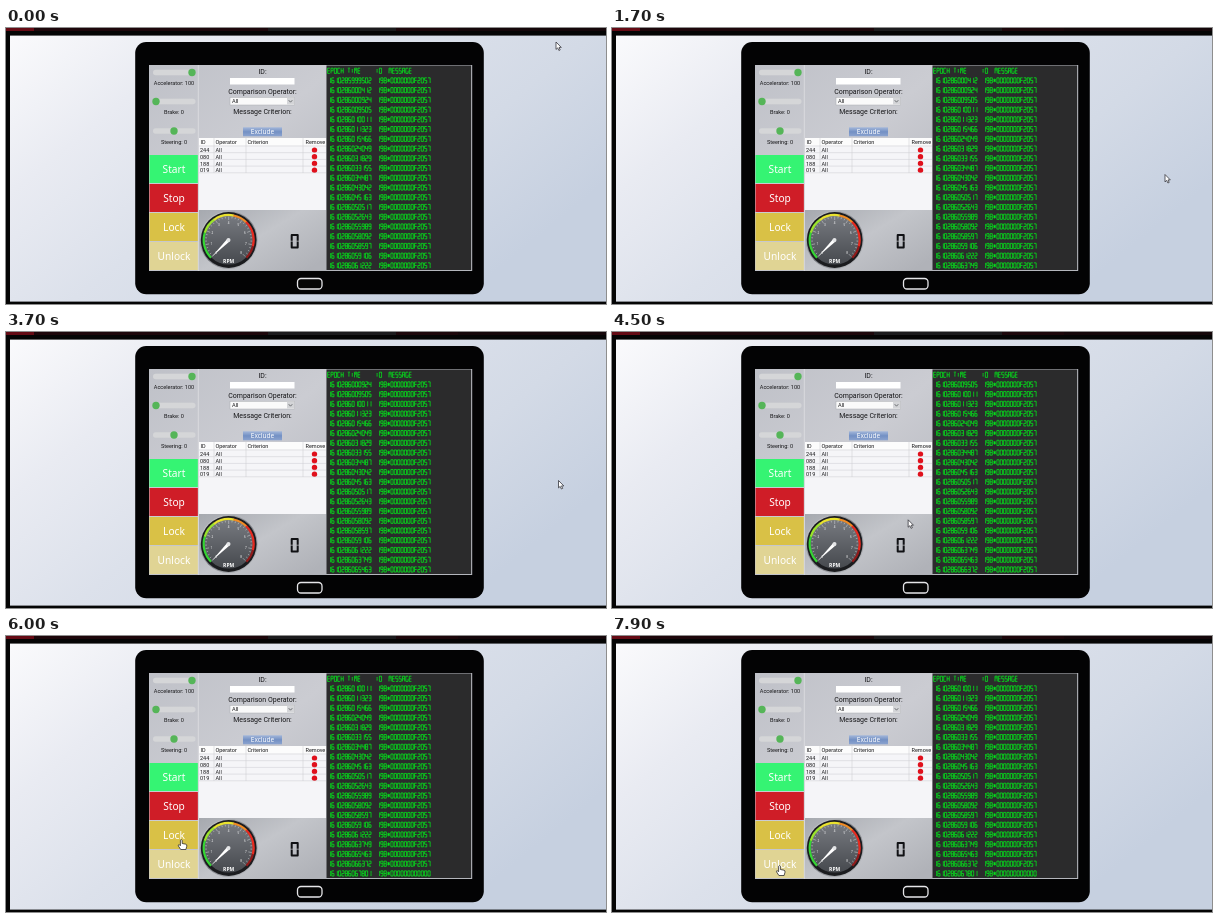
These frames come from a looping animation (600 by 276 pixels, 8 s). An HTML page:

```html
<!DOCTYPE html>
<html lang="en">
<head>
<meta charset="utf-8">
<title>Vehicle message monitor</title>
<style>
html, body { margin: 0; width: 100%; height: 100%; overflow: hidden; background: #000; }
svg { display: block; width: 100vw; height: 100vh; }
.ui { font-family: Roboto, Arial, sans-serif; fill: #151517; }
.btn { font-family: "Noto Sans", "Open Sans", sans-serif; fill: #fff; }
.mid { text-anchor: middle; }
.seg { fill: none; stroke: #00f01a; stroke-width: .75; }
</style>
</head>
<body>
<svg id="stage" viewBox="0 0 600 276" xmlns="http://www.w3.org/2000/svg"></svg>
<script>
const LOOP = 8000, STEP = 100, ROW = 9.74, ADVANCE = 3.37;
const stage = document.getElementById('stage');

const rect = (x, y, w, h, fill, more = '') =>
  `<rect x="${x}" y="${y}" width="${w}" height="${h}" fill="${fill}" ${more}/>`;
const circle = (x, y, r, fill, more = '') =>
  `<circle cx="${x}" cy="${y}" r="${r}" fill="${fill}" ${more}/>`;
const text = (s, x, y, size, cls = 'ui', more = '') =>
  `<text x="${x}" y="${y}" font-size="${size}" class="${cls}" ${more}>${s}</text>`;
const gradient = (id, dir, ...colors) =>
  `<linearGradient id="${id}" x2="${dir[0]}" y2="${dir[1]}">` + colors.map((c, i) =>
    `<stop offset="${i / (colors.length - 1)}" stop-color="${c}"/>`).join('') + '</linearGradient>';

// Segment lettering: a-g as on a display, i/l centre bars, x and y diagonals.
const GLYPHS = {
  0: 'abcdef', 1: 'bc', 2: 'abged', 3: 'abgcd', 4: 'fgbc', 5: 'afgcd', 6: 'afgedc', 7: 'abc',
  8: 'abcdefg', 9: 'abcdfg', A: 'abcefg', C: 'adef', D: 'abcdef', E: 'adefg', F: 'aefg', G: 'acdef',
  H: 'bcefg', I: 'il', M: 'abcefi', O: 'abcdef', P: 'abefg', S: 'afgcd', T: 'ail', '#': 'gilxy'
};
function segments(s, x, y, w = 2.2, h = 5.2) {
  const m = h / 2, c = w / 2;
  const bars = {
    a: [0, 0, w, 0], b: [w, 0, w, m], c: [w, m, w, h], d: [0, h, w, h], e: [0, m, 0, h],
    f: [0, 0, 0, m], g: [0, m, w, m], i: [c, h * .15, c, m], l: [c, m, c, h * .85],
    x: [0, h * .25, w, h * .75], y: [w, h * .25, 0, h * .75]
  };
  let d = '';
  [...s].forEach((ch, n) => {
    for (const k of GLYPHS[ch] || '') {
      const [x1, y1, x2, y2] = bars[k], ox = x + n * ADVANCE;
      d += `M${(ox + x1).toFixed(2)} ${(y + y1).toFixed(2)}L${(ox + x2).toFixed(2)} ${(y + y2).toFixed(2)}`;
    }
  });
  return `<path d="${d}" aria-label="${s}"/>`;
}

function slider(y, knob, label) {
  return rect(147, y - 2.7, 42.5, 5.4, '#d5d6d8', 'rx="2.7"') + circle(knob, y, 3.7, '#55b558') +
    text(label, 168, y + 12.6, 5.55, 'ui mid');
}

function button(label, y, fill) {
  return rect(143.5, y, 48.5, 28, fill) + text(label, 168, y + 17.9, 10.2, 'btn mid');
}

function table() {
  let s = rect(193, 110, 127.5, 72, '#f5f5f8') + rect(193, 110, 127.5, 7.5, '#fcfcfc');
  for (const [label, x] of [['ID', 194.5], ['Operator', 209.5], ['Criterion', 241.5], ['Remove', 299.5]])
    s += text(label, x, 115.8, 5.5);
  ['244', '080', '188', '019'].forEach((id, i) => {
    const y = 124.3 + i * 6.7;
    s += text(id, 194, y, 5.5) + text('All', 209.5, y, 5.5) + circle(308.5, y - 2.2, 2.7, '#e0101c');
  });
  let grid = '';
  for (let i = 0; i < 5; i++) grid += `M193 ${118 + i * 6.7}H320`;
  for (const x of [208, 240, 297]) grid += `M${x} 110V145`;
  return s + `<path d="${grid}" stroke="#c9c9ce" stroke-width=".5"/>`;
}

const polar = (r, deg) => {
  const a = deg * Math.PI / 180;
  return `${(222.7 + r * Math.sin(a)).toFixed(2)} ${(212 - r * Math.cos(a)).toFixed(2)}`;
};
const arc = (from, to, color) =>
  `<path d="M${polar(25, from)}A25 25 0 0 1 ${polar(25, to)}" fill="none" stroke="${color}" stroke-width="2.2"/>`;

function gauge() {
  let s = circle(222.7, 212, 29, 'url(#chrome)') + circle(222.7, 212, 27.9, '#1b1c1f') +
    circle(222.7, 212, 24.6, 'url(#dial)');
  s += arc(-135, -72, '#35d534') + arc(-73, -35, '#9be32c') + arc(-36, 12, '#e9e22f') +
    arc(11, 45, '#f08b24') + arc(44, 105, '#e62b20') + arc(104, 135, '#8f1b1b');
  let ticks = '';
  for (let i = 0; i <= 32; i++)
    ticks += `M${polar(i % 4 ? 21.8 : 20, -135 + i * 270 / 32)}L${polar(23.5, -135 + i * 270 / 32)}`;
  s += `<path d="${ticks}" stroke="#d9dadd" stroke-width=".5"/>`;
  for (let i = 0; i <= 8; i++) {
    const [x, y] = polar(17.6, -135 + i * 33.75).split(' ');
    s += text(i, x, +y + 1.1, 3, 'btn mid');
  }
  return s + text('RPM', 222.7, 234.5, 5, 'btn mid', 'font-weight="700"') +
    '<path d="M205.8 228.7L221.4 210.7L223.8 213.2Z" fill="#fff"/>' + circle(222.5, 212, 2, '#e4e5e7');
}

const EPOCHS = [5999502, 6000412, 6000924, 6009505, 6010011, 6011323, 6015466, 6024049,
  6031829, 6033155, 6034487, 6043042, 6045163, 6050517, 6052643, 6055989, 6058092, 6058597,
  6059106, 6061222, 6063749, 6065463, 6066372, 6067801];
const VISIBLE = 20;
// Newly received rows arrive at their own timestamps.
const arrivals = EPOCHS.slice(VISIBLE).map(e => e - EPOCHS[VISIBLE] + 1500);

function terminal() {
  const rows = EPOCHS.map((e, i) => {
    const y = 49.8 + i * ROW;
    const data = i === EPOCHS.length - 1 ? '000000000000' : '0000000F2057';
    return segments(String(1610280000000 + e), 322.4, y) + segments('198#' + data, 371.4, y);
  }).join('');
  return rect(320.5, 37, 145.7, 206, '#b4b6bc') + rect(320.5, 37.5, 144.6, 204.5, '#2b2b2c') +
    '<g class="seg">' +
    segments('EPOCH TIME', 321.6, 40.2) + segments('ID', 370, 40.2) + segments('MESSAGE', 383, 40.2) +
    `<g clip-path="url(#log)"><g id="rows">${rows}</g></g></g>`;
}

const defs = '<defs>' +
  gradient('page', [1, .55], '#fafafc', '#e9ebf2', '#dce1eb', '#d3dae6', '#c6d0e0') +
  gradient('metal', [.7, 1], '#bfc1c8', '#cbccd2', '#b6b8bf') +
  gradient('lower', [1, .8], '#a6a9af', '#c3c5ca', '#b0b2b8') +
  gradient('blue', [0, 1], '#a3b7da', '#7390c4', '#8ba3cf') +
  gradient('chrome', [1, 1], '#d9dbde', '#7b7e84', '#c9cbcf') +
  gradient('dial', [0, 1], '#777a80', '#46494e') +
  '<clipPath id="log"><rect x="320" y="48.3" width="146" height="193.7"/></clipPath></defs>';

const browser = rect(0, 0, 600, 276, '#050505') + rect(0, 0, 452, 3, '#1d070b') +
  rect(0, 0, 28, 3, '#650b15') + rect(262, 0, 128, 3, '#1c1b1d') + rect(452, 0, 148, 3, '#15070a') +
  rect(4, 7.6, 596, 266, 'url(#page)');

const tablet = rect(129.2, 14, 348.6, 252.3, '#030304', 'rx="11"') +
  rect(291.5, 250.5, 24.5, 10.5, '#050505', 'rx="3.5" stroke="#e6e6e9" stroke-width="1.3"');

const controls = rect(143, 37, 178, 206, 'url(#metal)') +
  slider(44.5, 186, 'Accelerator: 100') + slider(73.5, 150, 'Brake: 0') + slider(103, 168, 'Steering: 0') +
  button('Start', 127, '#35f473') + button('Stop', 156, '#cf1d27') +
  button('Lock', 185, '#d9c146') + button('Unlock', 214, '#e0d494') +
  '<path d="M192.3 37V243" stroke="#e2e3e7" stroke-width=".7"/>';

const filter = text('ID:', 256.5, 46, 7, 'ui mid') + rect(224, 50, 64.5, 6.5, '#fff') +
  text('Comparison Operator:', 256.5, 66, 7, 'ui mid') +
  rect(224, 69.3, 64.5, 7.7, '#fafafa', 'stroke="#a9abb0" stroke-width=".5"') +
  rect(281, 69.8, 7, 6.7, '#d4d5d8') +
  '<path d="M282.7 72.2L284.5 74.2L286.3 72.2" fill="none" stroke="#55575b" stroke-width=".8"/>' +
  text('All', 226, 75.3, 5.6) + text('Message Criterion:', 256.5, 86, 7, 'ui mid') +
  rect(237, 99.3, 39, 9, 'url(#blue)') + text('Exclude', 256.5, 106.2, 6.5, 'btn mid');

const speed = rect(193, 182, 127.5, 61, 'url(#lower)') + gauge() +
  '<g fill="none" stroke="#101114" stroke-width="2" stroke-linecap="round">' +
  segments('0', 285.7, 207, 6, 12.4) + '</g>' +
  '<path d="M284 213.2h3.4M290 213.2h3.4" stroke="#b9bbc0" stroke-width=".7"/>';

const pointers =
  '<path id="arrow" d="M0 0V7.4L1.7 5.9L2.9 8.5L4.2 7.9L3 5.4H5.3Z" fill="#fff" stroke="#2c2c33" stroke-width=".75" stroke-linejoin="round"/>' +
  '<path id="hand" d="M-.9 .8Q0 -.6 .9 .8V4L4.5 4.7Q5.8 5 5.5 6.7L4.6 10H-.6L-3 6.3Q-3.2 4.8 -1.7 5.4L-.9 6.2Z" fill="#fff" stroke="#222226" stroke-width=".75" stroke-linejoin="round"/>';

stage.innerHTML = defs + browser + tablet + controls + filter + table() + speed + terminal() + pointers;

const [rows, arrow, hand] = ['rows', 'arrow', 'hand'].map(id => document.getElementById(id));

// Pointer stops: time, x, y.
const PATH = [
  [0, 550, 14], [600, 561, 86], [900, 553, 146.5], [2400, 553, 146.5], [2600, 552.5, 148.5],
  [4000, 552.5, 148.5], [4800, 177.5, 206], [5300, 177.5, 206], [5600, 175.3, 203.5],
  [6600, 175.3, 203.5], [7300, 167.5, 229.5], [8000, 167.5, 229.5]
];
function pointerAt(t) {
  const i = PATH.findIndex(p => p[0] > t);
  const [t0, x0, y0] = PATH[i - 1], [t1, x1, y1] = PATH[i];
  const u = (t - t0) / (t1 - t0), k = u * u * (3 - 2 * u);
  return [x0 + (x1 - x0) * k, y0 + (y1 - y0) * k];
}

function draw(time) {
  const t = Math.floor(time % LOOP / STEP) * STEP;
  const received = arrivals.filter(a => a <= t).length;
  rows.setAttribute('transform', `translate(0 ${-received * ROW})`);
  const [x, y] = pointerAt(t);
  const overButton = x > 143 && x < 192 && y > 127;
  arrow.style.display = overButton ? 'none' : '';
  hand.style.display = overButton ? '' : 'none';
  (overButton ? hand : arrow).setAttribute('transform', `translate(${x} ${y})`);
}

const start = performance.now();
function tick() {
  draw(performance.now() - start);
  requestAnimationFrame(tick);
}
tick();
</script>
</body>
</html>
```
